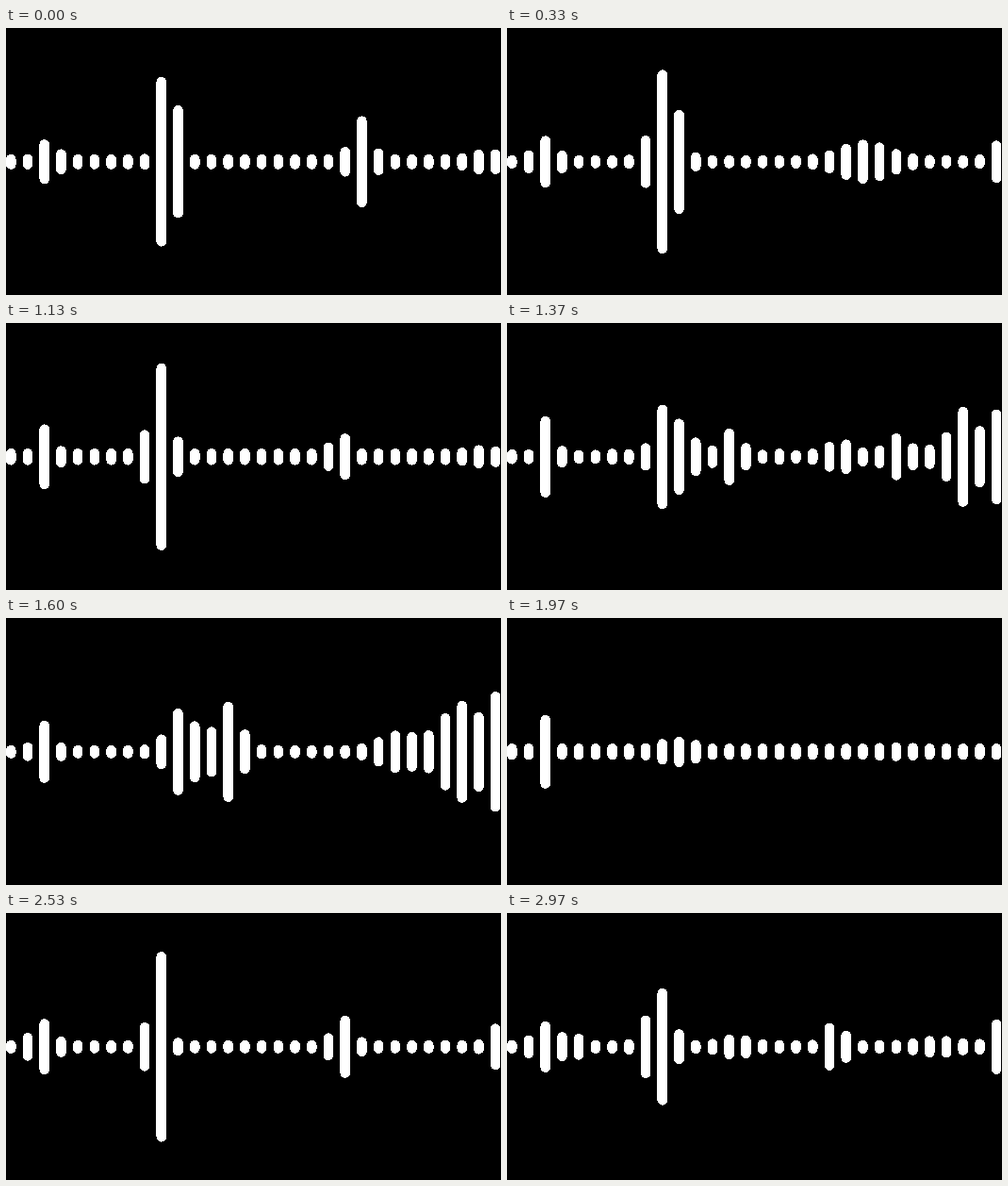
An HTML page for the animation above (3.01 s loop, 525 px wide and 283 px high).

```html
<!DOCTYPE html>
<html>
<head>
<meta charset="utf-8">
<style>
html, body { margin: 0; width: 100%; height: 100%; overflow: hidden; background: #000 }
svg { display: block }
path { stroke: #fff; stroke-width: 10.6; stroke-linecap: round; shape-rendering: crispEdges }
</style>
</head>
<body>
<svg width="525" height="283"><path id="wave"/></svg>
<script>
const wave = document.getElementById('wave');
const LOOP = 3010, BARS = 30, LEFT = 5.3, PITCH = 17.72, CAP = 5.3, MID = 141.8, FLOOR = 7;

// Key sounds: tick, height of quiet bars, then bell-shaped tones as [bar, strength, spread]
const sounds = [
  [0, 8, [2.26, 19, 0.5], [9.4, 119, 0.47], [20.97, 41.5, 0.55], [28.5, 7, 1]],
  [8, 6.7, [2, 20.5, 0.6], [9.2, 94.4, 0.69], [21.1, 16.5, 1.4], [29, 15.5, 0.4]],
  [28, 8.8, [2.1, 28, 0.47], [8.94, 92.7, 0.55], [19.68, 21.9, 0.48], [28.2, 5.5, 1]],
  [40, 7, [2, 26, 0.48], [10.23, 40.8, 0.77], [13, 46, 0.7], [23.2, 15.5, 1.1], [27, 47, 1.2], [29, 45, 0.4]],
  [49, 8.7, [2, 32, 0.37], [9.9, 9.2, 1.1], [23, 3, 1.5]],
  [63, 7, [1.88, 23, 0.6], [8.81, 103, 0.44], [19.88, 26.6, 0.55], [29, 17.5, 0.4]],
  [74, 7.2, [2.1, 20.3, 0.67], [4, 6.5, 0.4], [8.82, 57, 0.66], [13.4, 7, 0.8], [19.36, 23.6, 0.49], [25.5, 5, 1.1], [29, 22, 0.4]]
].map(([tick, quiet, ...tones]) => ({tick, quiet, tones}));

const mix = (a, b, p) => a + (b - a) * p;
const bell = (d, spread) => Math.exp(-d * d / (2 * spread * spread));
const flutter = (tick, bar) => Math.sin(tick * 1.3 + bar * bar * 2.1) * Math.sin(tick * 0.47 + bar * 1.7);

const level = ({quiet, tones}, bar) => Math.max(quiet,
  tones.reduce((sum, [at, strength, spread]) => sum + strength * bell(bar - at, spread), FLOOR));

// Blend neighbouring sounds, fluttering more the further away they are
function halfHeight(tick, bar) {
  const next = Math.max(1, sounds.findIndex(s => s.tick >= tick));
  const a = sounds[next - 1], b = sounds[next];
  const base = mix(level(a, bar), level(b, bar), (tick - a.tick) / (b.tick - a.tick));
  const loose = Math.min(1, (tick - a.tick) / 3, (b.tick - tick) / 3);
  const h = 6 + (base - 6) * Math.exp(0.8 * loose * flutter(tick, bar));
  return Math.min(h, Math.max(base, 105));
}

// 30 steps a second, the second step of every six repeats the first
function tickAt(ms) {
  const rest = ms % 100;
  const step = Math.min(89, Math.floor(ms / 100) * 3 + (rest >= 30) + (rest >= 70));
  return 5 * Math.floor(step / 6) + Math.max(0, step % 6 - 1);
}

function draw() {
  const tick = tickAt(performance.now() % LOOP);
  let d = '';
  for (let i = 0; i < BARS; i++) {
    const reach = halfHeight(tick, i) - CAP;
    d += `M${LEFT + i * PITCH} ${MID - reach}V${MID + reach}`;
  }
  wave.setAttribute('d', d);
  requestAnimationFrame(draw);
}
draw();
</script>
</body>
</html>
```
